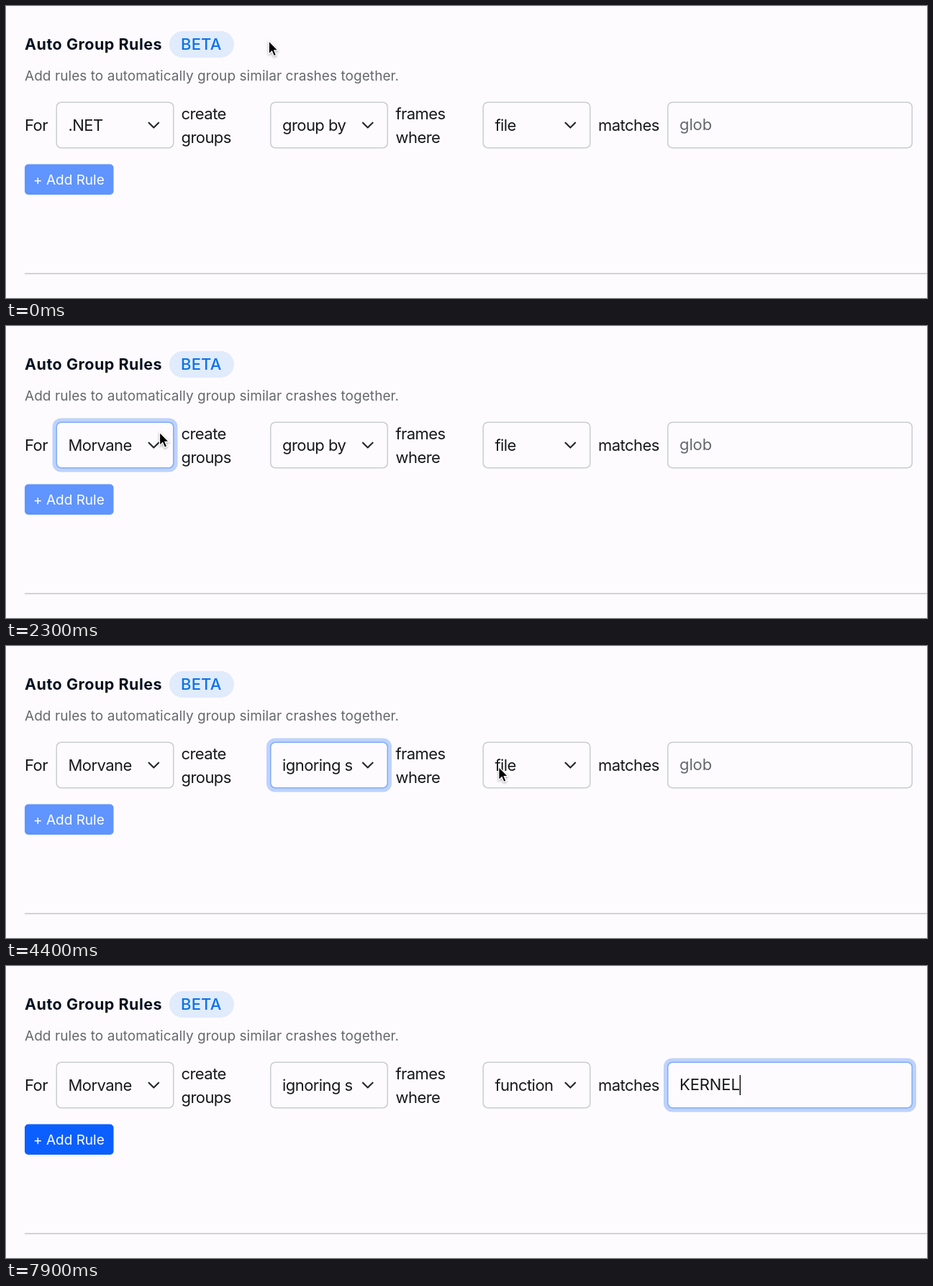
Animation of 1280 by 407 pixels, one loop 8 s. Source, as an HTML page:

```html
<!DOCTYPE html>
<html lang="en">
<head>
<meta charset="utf-8">
<title>Auto Group Rules</title>
<style>
  html, body { margin: 0; width: 100%; height: 100%; overflow: hidden; background: #fdfbfe; }
  svg { display: block; width: 1280px; height: 407px; }
  text { font: 22px Inter, "Liberation Sans", sans-serif; letter-spacing: -.56px; fill: #17181a; white-space: pre; }
  .title { font-size: 21.5px; font-weight: 700; letter-spacing: .5px; fill: #06101f; }
  .beta { font-weight: 500; letter-spacing: .2px; fill: #0b72e7; }
  .note { font-size: 19px; letter-spacing: .06px; fill: #65686c; }
  .button { font-size: 19px; letter-spacing: 0; fill: #fff; }
  .input { letter-spacing: -.1px; }
  .hint { letter-spacing: -.1px; fill: #64686d; }
  .item { letter-spacing: -.68px; }
  .picked { fill: #fff; }
  .menu { filter: drop-shadow(0 7px 12px rgba(0, 0, 0, .27)); }
  .pointer { filter: drop-shadow(0 1.5px 1.5px rgba(0, 0, 0, .35)); }
</style>
</head>
<body>
<svg id="stage" viewBox="0 0 1280 407"></svg>
<script>
const LOOP = 8000, STEP = 100, ROW = 35.5;
const stage = document.getElementById('stage');

// Pointer path: time, x, y of the tip
const path = [
  [0, 365, 48], [900, 133, 124], [1200, 142, 164], [1400, 150, 164], [1800, 202, 146],
  [2200, 202, 146], [2900, 405, 174], [3300, 405, 174], [3600, 405, 200], [4000, 405, 200],
  [4500, 717, 164], [4900, 717, 164], [5100, 715, 132], [5600, 715, 132], [6100, 970, 168], [LOOP, 970, 168]
];
const menus = [
  { x: 58, y: 109, w: 252, h: 340, open: 1300, close: 2100, checked: 1, pick: 0,
    items: ['Morvane Native', '.NET', '.NET Standard', 'Breakpad/Crashpad', 'tavOX', 'Java', 'JavaScript', 'Dovra'] },
  { x: 355, y: 144, w: 466, h: 86, open: 3300, close: 3900, checked: 0, pick: 1,
    items: ['group by', 'ignoring stack frames up to and including'] },
  { x: 650, y: 109, w: 153, h: 86, open: 4800, close: 5600, checked: 1, pick: 0,
    items: ['function', 'file'] }
];
const word = 'KERNEL', typeStart = 6900, typeGap = 180;

const clamp = v => Math.max(0, Math.min(1, v));
const ramp = (t, from, length = 200) => clamp((t - from) / length);
const mix = (a, b, k) => `rgb(${a.map((v, i) => Math.round(v + (b[i] - v) * k))})`;
const text = (x, y, s, cls = '') => `<text x="${x}" y="${y}" class="${cls}">${s}</text>`;
const rect = (x, y, w, h, r, attrs) =>
  `<rect x="${x}" y="${y}" width="${w}" height="${h}" rx="${r}" ${attrs}/>`;
const line = (d, color, width, more = '') =>
  `<path d="${d}" fill="none" stroke="${color}" stroke-width="${width}" ${more}/>`;

function pointerAt(t) {
  const i = Math.max(1, path.findIndex(p => p[0] > t));
  const [t0, x0, y0] = path[i - 1], [t1, x1, y1] = path[i];
  const k = clamp((t - t0) / (t1 - t0)), e = k * k * (3 - 2 * k);
  return [x0 + (x1 - x0) * e, y0 + (y1 - y0) * e];
}

function field(x, w, focus) {
  const spread = 5 * focus;
  const ring = focus ? rect(x - spread, 133.5 - spread, w + 2 * spread, 65 + 2 * spread, 7 + spread,
    `fill="#bed2fc" opacity="${focus}"`) : '';
  return ring + rect(x + .75, 134.25, w - 1.5, 63.5, 6.5,
    `fill="#fdfbfe" stroke="${mix([200, 205, 208], [128, 172, 250], focus)}" stroke-width="1.5"`);
}

function select(x, w, label, focus) {
  return field(x, w, focus) + text(x + 17, 174, label) +
    line(`M${x + w - 35} 162.7l6.8 6.8 6.8-6.8`, '#26282b', 2.2, 'stroke-linecap="round" stroke-linejoin="round"');
}

function menu(m, t, y) {
  const fade = 1 - ramp(t, m.close - STEP, 300);
  if (t < m.open || !fade) return '';
  // The chosen row blinks off just before the menu closes
  const hover = t < m.close - STEP ? Math.floor((y - m.y - 7) / ROW) : t < m.close ? -1 : m.pick;
  const opacity = t < m.close ? 1 : fade;
  const rows = m.items.map((s, i) => {
    const on = i === hover, top = m.y + 7 + i * ROW, base = top + 24.5;
    return (on ? rect(m.x + 7, top, m.w - 14, ROW, 5, 'fill="#478ffb"') : '') +
      text(m.x + 33.3, base, s, on ? 'item picked' : 'item') +
      (i === m.checked ? line(`M${m.x + 14} ${base - 5}l4.3 5.3 7.5-12.5`, on ? '#fff' : '#17181a', 2.3,
        'stroke-linecap="round" stroke-linejoin="round"') : '');
  });
  return `<g opacity="${opacity}">` +
    rect(m.x + .5, m.y + .5, m.w - 1, m.h - 1, 8, 'class="menu" fill="#e2dfdf" stroke="#bfbcbc"') +
    rows.join('') + '</g>';
}

function pointer(t, x, y) {
  if (t >= typeStart) return '';
  if (x > 919) {
    const d = `M${x - 4} ${y - 11}q4 0 4 3.5v16q0 3.5-4 3.5m8-23q-4 0-4 3.5m0 16q0 3.5 4 3.5m-7-9h6`;
    return line(d, '#fff', 4) + line(d, '#111', 1.8);
  }
  return `<path class="pointer" transform="translate(${x + .2} ${y + .6}) scale(1.12)"
    d="M0 0V16.6L3.8 13 6.3 19 9.3 17.7 6.8 11.9H11.8Z" fill="#000" stroke="#fff" stroke-width="1.2"/>`;
}

function draw(t) {
  const [x, y] = pointerAt(t);
  const focus = (from, to) => ramp(t, from) * (1 - ramp(t, to));
  const typed = word.slice(0, Math.max(0, Math.floor((t - typeStart) / typeGap) + 1));
  const caretOn = t >= 6300 && (typed || (t - 6300) % 1000 < 500);

  stage.innerHTML =
    text(26, 61, 'Auto Group Rules', 'title') +
    rect(227, 35, 90, 37, 18.5, 'fill="#e0ebfc"') + text(243, 61, 'BETA', 'beta') +
    text(26, 104, 'Add rules to automatically group similar crashes together.', 'note') +
    text(26, 174, 'For') +
    text(243.5, 158, 'create') + text(243.5, 191, 'groups') +
    text(541.5, 158, 'frames') + text(541.5, 191, 'where') +
    text(823, 174, 'matches') +
    select(69.5, 164, t < 2100 ? '.NET' : 'Morvane', focus(1200, 3200)) +
    select(367, 164, t < 3900 ? 'group by' : 'ignoring s', focus(3200, 4700)) +
    select(662.5, 150, t < 5600 ? 'file' : 'function', focus(4700, 6200)) +
    field(919, 341, ramp(t, 6200)) +
    `<text x="936" y="173" class="${typed ? 'input' : 'hint'}" id="value">${typed || 'glob'}</text>` +
    rect(26, 220.5, 123.5, 42.5, 5, `fill="${mix([96, 148, 255], [11, 95, 255], ramp(t, typeStart))}"`) +
    text(38, 248.5, '+ Add Rule', 'button') +
    line('M26 373H1280', '#c5c4c7', 1.6) +
    menus.map(m => menu(m, t, y)).join('');

  if (caretOn) {
    const end = typed ? document.getElementById('value').getComputedTextLength() : 1;
    stage.insertAdjacentHTML('beforeend', line(`M${936.5 + end} 152V180`, '#111', 1.5));
  }
  stage.insertAdjacentHTML('beforeend', pointer(t, x, y));
}

const start = performance.now();
let shown = -1;
function tick() {
  const t = Math.floor((performance.now() - start) % LOOP / STEP) * STEP;
  if (t !== shown) draw(shown = t);
  requestAnimationFrame(tick);
}
tick();
</script>
</body>
</html>
```
